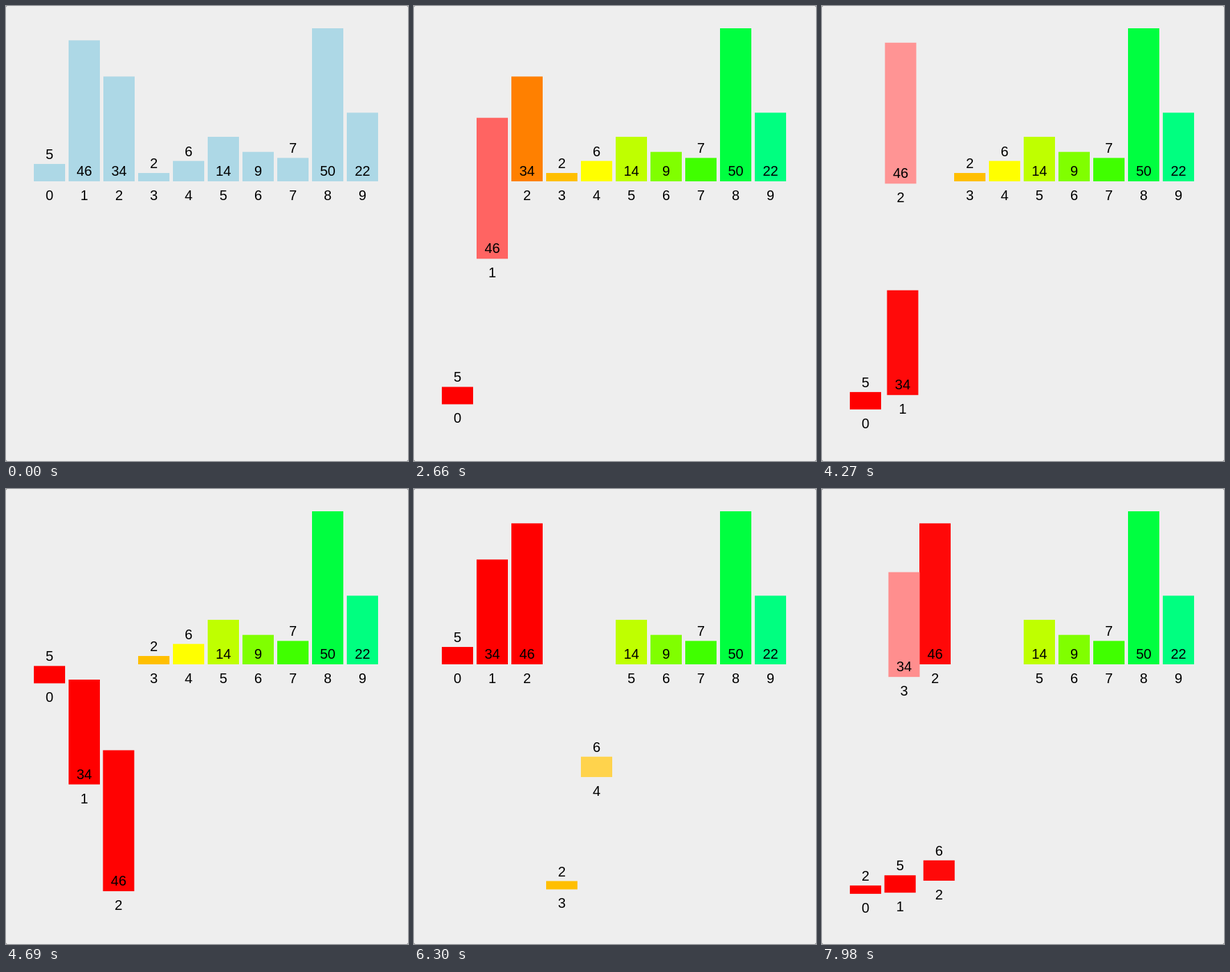
Animation of 578 by 654 pixels, one loop 8000 ms. Source, as an HTML page:

```html
<!DOCTYPE html>
<html lang="en">
<head>
<meta charset="utf-8">
<title>Merge sort</title>
<style>
  html, body { margin: 0; width: 100%; height: 100%; overflow: hidden; background: #666; }
  svg { display: block; width: 578px; height: 654px; background: #eee; border-radius: 2px; }
  text { font: 20px "Liberation Sans", Arial, sans-serif; text-anchor: middle; }
</style>
</head>
<body>
<svg id="stage" viewBox="0 0 578 654"></svg>
<script>
const LOOP = 8000, STEP = 70, STIFFNESS = 0.015;
const BASE = 252, DROP = 330, BAR_WIDTH = 45, UNIT = 13 / 3;
const COLORING = 920, LIGHT_LEAD = 30, LIGHT_LAG = 90;
const TAKE_GAP = 185, COPY_GAP = 280, RETURN_DELAY = 155, RETURN_GAP = 168;

const stage = document.getElementById("stage");
function add(tag) {
  return stage.appendChild(document.createElementNS("http://www.w3.org/2000/svg", tag));
}

const slotX = slot => 40 + 50 * slot;

// Steps of 15 degrees that leave out pure green.
const slotHue = slot => 15 * (slot < 8 ? slot : slot + 1);

function rgb(hue, light = 0.5) {
  const spread = Math.min(light, 1 - light);
  return [0, 8, 4].map(n => {
    const k = (n + hue / 30) % 12;
    return 255 * (light - spread * Math.max(-1, Math.min(k - 3, 9 - k, 1)));
  });
}

// Critically damped spring from 0 to 1.
function spring(ms) {
  const w = STIFFNESS * Math.max(0, ms);
  return 1 - (1 + w) * Math.exp(-w);
}

// Follows a list of [time, target] pairs; the first one is the resting value.
function follow(track, t) {
  return track.reduce((sum, [at, target], i) =>
    i ? sum + (target - track[i - 1][1]) * spring(t - at) : target, 0);
}

const bars = [5, 46, 34, 2, 6, 14, 9, 7, 50, 22].map((value, i) => {
  const bar = {
    value, height: 3.3 + value * UNIT,
    x: [[0, slotX(i)]], y: [[0, BASE]], label: [[0, i]],
    color: [[0, [173, 216, 230]], [COLORING, rgb(slotHue(i))]],
    rect: add("rect"), valueText: add("text"), indexText: add("text")
  };
  bar.rect.setAttribute("width", BAR_WIDTH);
  bar.rect.setAttribute("height", bar.height);
  bar.valueText.textContent = value;
  return bar;
});

const order = [...bars];

// Schedules one merge of the runs [low, mid) and [mid, high).
function merge(time, low, mid, high) {
  const left = order.slice(low, mid), right = order.slice(mid, high), merged = [];
  const hue = slotHue(low);
  const lightUp = (bar, at) => bar.color.push([at, rgb(hue, 0.8)]);
  lightUp(left[0], time - LIGHT_LEAD);
  lightUp(right[0], time - LIGHT_LEAD);

  let copying = false;
  while (left.length || right.length) {
    const run = !right.length || left.length && left[0].value <= right[0].value ? left : right;
    const bar = run.shift(), slot = low + merged.length;
    bar.color.push([time, rgb(hue)]);
    bar.x.push([time, slotX(slot)]);
    bar.y.push([time, BASE + DROP]);
    bar.label.push([time, slot]);
    merged.push(bar);
    if (run.length) lightUp(run[0], time + (copying ? 0 : LIGHT_LAG));

    if (merged.length === high - low) break;
    const oneLeft = !left.length || !right.length;
    time += oneLeft && !copying ? COPY_GAP : TAKE_GAP;
    copying = oneLeft;
  }

  merged.forEach((bar, i) => bar.y.push([time + RETURN_DELAY + i * RETURN_GAP, BASE]));
  order.splice(low, merged.length, ...merged);
}

merge(2300, 0, 1, 2);
merge(3795, 0, 2, 3);
merge(5910, 3, 4, 5);
merge(7305, 0, 3, 5);

function place(node, x, y) {
  node.setAttribute("x", x.toFixed(2));
  node.setAttribute("y", y.toFixed(2));
}

function draw(t) {
  for (const bar of bars) {
    const x = follow(bar.x, t), bottom = follow(bar.y, t), top = bottom - bar.height;
    const center = x + BAR_WIDTH / 2;
    const color = [0, 1, 2].map(c => Math.round(follow(bar.color.map(([at, v]) => [at, v[c]]), t)));
    place(bar.rect, x, top);
    bar.rect.setAttribute("fill", `rgb(${color})`);
    place(bar.valueText, center, bar.height < 40 ? top - 7 : bottom - 8);
    place(bar.indexText, center, bottom + 27);
    bar.indexText.textContent = bar.label.filter(([at]) => at <= t).pop()[1];
  }
}

const start = performance.now();
function tick() {
  const t = (performance.now() - start) % LOOP;
  draw(Math.floor(t / STEP) * STEP);
  requestAnimationFrame(tick);
}
tick();
</script>
</body>
</html>
```
